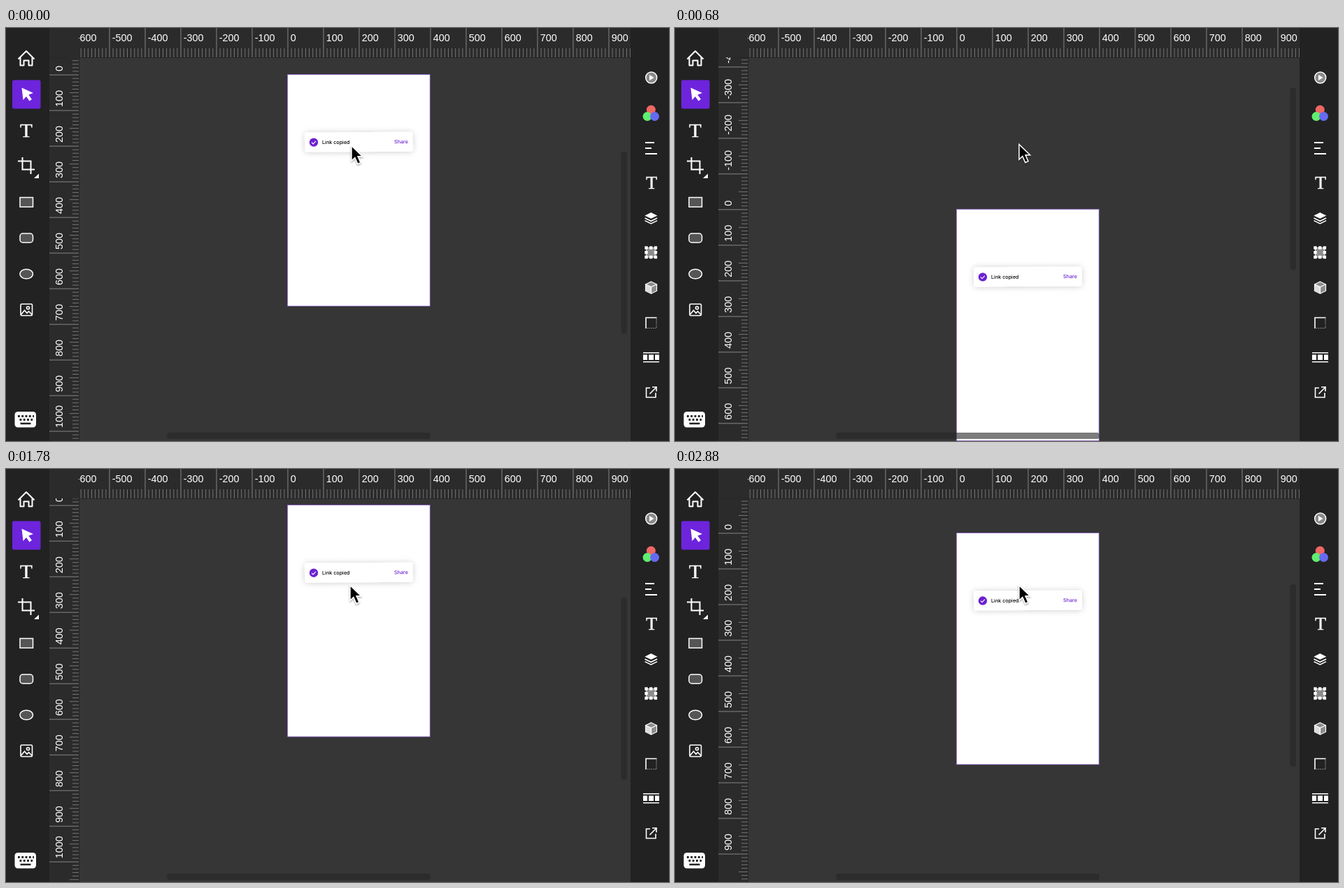
Animation, 948 px wide and 591 px high, one loop 2.91 s. Source, as an HTML page:

```html
<!DOCTYPE html>
<html lang="en">
<head>
<meta charset="utf-8">
<style>
  html, body { margin: 0; width: 100%; height: 100%; overflow: hidden; background: #363636; }
  svg { display: block; width: 948px; height: 591px; }
  .ruler text { font: 14.4px "Liberation Sans", Arial, sans-serif; fill: #fff; }
  .ruler path { stroke: #858585; fill: none; }
  .ruler .minor { stroke: #747474; }
  .toast text { font: 500 7.2px Inter, "Liberation Sans", sans-serif; fill: #000; }
  .toast .action { fill: #6b22d2; }
  .letter { font: 27px "Liberation Serif", serif; fill: #fff; stroke: #fff; stroke-width: .4; text-anchor: middle; }
  .line { fill: none; stroke: #fff; stroke-width: 2; }
  .thin { stroke-width: 1.6; }
  .shape { fill: #555; stroke: #fff; stroke-width: 1.5; }
</style>
</head>
<body>
<svg viewBox="0 0 948 591">
  <defs>
    <clipPath id="topClip"><rect x="104" width="789" height="42"/></clipPath>
    <clipPath id="sideClip"><rect x="62" y="42" width="42" height="549"/></clipPath>
    <filter id="soft" x="-20%" y="-80%" width="140%" height="260%">
      <feDropShadow dx="0" dy="0.5" stdDeviation="4.5" flood-opacity=".2"/>
    </filter>
    <filter id="cursorShadow" x="-50%" y="-50%" width="200%" height="200%">
      <feDropShadow dx="0" dy="1.5" stdDeviation="1.2" flood-opacity=".4"/>
    </filter>
  </defs>

  <rect width="948" height="591" fill="#363636"/>

  <g id="page">
    <rect x="402.5" y="-.6" width="203.7" height="331.5" fill="#fff" stroke="#8250c8" stroke-width=".7"/>
    <g class="toast" transform="rotate(-.3 504.5 96)">
      <rect x="427.3" y="82" width="154.5" height="28" rx="4" fill="#fff" filter="url(#soft)"/>
      <circle cx="440" cy="96.2" r="6.2" fill="#6b22d2"/>
      <path d="M437 96.3l2.1 2.1 3.9-4" fill="none" stroke="#fff" stroke-width="1.1"/>
      <text x="452" y="98.7">Link copied</text>
      <text class="action" x="555" y="98.5">Share</text>
    </g>
  </g>

  <rect x="230.5" y="579" width="376" height="9" rx="3" fill="#262626" fill-opacity=".6"/>
  <rect id="scrollbar" x="879.5" width="8.5" height="261" rx="4" fill="#262626" fill-opacity=".6"/>

  <path d="M62 0H893V42H104V591H62z" fill="#2b2b2b"/>
  <path d="M62 42.5H893M104.5 42V591" stroke="#262626"/>
  <g class="ruler" clip-path="url(#topClip)"><g id="topRuler" transform="translate(403 0)"></g></g>
  <g class="ruler" clip-path="url(#sideClip)"><g id="sideRuler"></g></g>

  <rect width="62" height="591" fill="#222"/>
  <rect x="893" width="55" height="591" fill="#222"/>

  <!-- left tools -->
  <rect x="9" y="74.5" width="40.500" height="41" rx="2.500" fill="#6d24dc"/>
  <path class="line" d="M17.500 44.500L29 33l11.500 11.500M20.500 42V53.500H25.500V46.500H32.500V53.500H37.500V42" stroke-linejoin="round"/>
  <path d="M22.500 85.500L39 93 32.300 95.400 37 102 33.500 104.500 29 98 24.500 103z" fill="#fff"/>
  <text class="letter" transform="translate(29 156) scale(1.080 1)">T</text>
  <path class="line" d="M17 190.500H35.500V209M23.500 185V202.500H41"/>
  <path d="M47 208.500V215H40z" fill="#fff"/>
  <rect class="shape" x="20" y="242.500" width="18.500" height="13.500"/>
  <rect class="shape" x="20" y="294" width="18.500" height="13" rx="4"/>
  <ellipse class="shape" cx="29.200" cy="352" rx="9.300" ry="6.800"/>
  <rect class="line thin" x="21" y="395" width="16.500" height="16.500" rx="1.500"/>
  <path class="line thin" d="M21.500 410l5-6 3.500 4 2.500-2.500 5 5"/>
  <circle class="line thin" cx="31.500" cy="400.500" r="2"/>
  <rect x="12.500" y="549" width="30.500" height="22.500" rx="4.500" fill="#fff"/>
  <path d="M17 555.500H40M19.500 560.500H38" stroke="#222" stroke-width="2.800" stroke-dasharray="2.800 2.500"/>
  <path d="M20.500 566H35.500" stroke="#222" stroke-width="2.500"/>

  <!-- right panels -->
  <circle cx="922.700" cy="71" r="8" fill="#8a8a8a" stroke="#fff" stroke-width="1.500"/>
  <path d="M920 67l6.500 4-6.500 4z" fill="#fff"/>
  <circle cx="922.300" cy="117" r="6.500" fill="#ee6864"/>
  <circle cx="917" cy="126.500" r="6.500" fill="#61ed70"/>
  <circle cx="927.500" cy="126.500" r="6.500" fill="#666af0"/>
  <path class="line" d="M914 164H927M914 172H923M914 180H931"/>
  <text class="letter" style="font-size:25px" transform="translate(923 230) scale(1.060 1)">T</text>
  <path d="M922.300 264l9 4.400-9 4.400-9-4.400z" fill="#fff"/>
  <path class="line thin" d="M913.500 272l8.800 4.300 8.800-4.300M913.500 275.600l8.800 4.300 8.800-4.300"/>
  <rect x="915.500" y="314.500" width="13.500" height="13.500" fill="#8c8c8c" stroke="#ddd"/>
  <g id="handles" fill="#fff"></g>
  <path d="M922.500 363l8 3.800v9.400l-8 4-8-4v-9.400z" fill="#8c8c8c" stroke="#fff" stroke-width="1.200"/>
  <path d="M914.500 366.800l8 3.800V380l-8-4z" fill="#ddd"/>
  <path class="line" style="stroke-width:1.200px" d="M914.500 366.800l8 3.800 8-3.800M922.500 370.600V380"/>
  <path class="line thin" d="M915 430V414.500H930.500"/>
  <path d="M930 416V429.500H916" fill="none" stroke="#bbb" stroke-width="1.200" stroke-dasharray="1.200 1.600"/>
  <path class="line thin" d="M911 464.800H934M911 477.700H934"/>
  <path d="M911 467.500h6v7.500h-6zM919 467.500h7v7.500h-7zM928 467.500h6v7.500h-6z" fill="#fff"/>
  <path class="line thin" d="M921 515H915.500V528.500H929V522M924 513.800H930V520M929.500 514.500L920.500 523.500"/>

  <path id="cursor" d="M0 0V21.500L4.900 17 8.900 26 13 24.200 9.100 15.300H15.700z" fill="#000" stroke="#fff" stroke-width="1.500" filter="url(#cursorShadow)"/>
</svg>
<script>
const LOOP = 2910, UNIT = 0.51, STAGE_HEIGHT = 591;
const byId = id => document.getElementById(id);
const add = (parent, tag, attrs, text = '') => {
  const node = document.createElementNS('http://www.w3.org/2000/svg', tag);
  for (const key in attrs) node.setAttribute(key, attrs[key]);
  node.textContent = text;
  parent.append(node);
  return node;
};

// Returns the labels with their positions along the ruler.
function buildRuler(group, from, to, vertical) {
  const edge = vertical ? 104 : 42, labels = [];
  let major = '', minor = '';
  for (let v = from; v <= to; v += 10) {
    const p = +(v * UNIT).toFixed(2);
    const length = v % 100 === 0 ? 42 : v % 50 === 0 || !vertical ? 13 : 9;
    const tick = vertical ? `M${edge - length} ${p}H${edge}` : `M${p} ${edge - length}V${edge}`;
    if (v % 100) { minor += tick; continue; }
    major += tick;
    const transform = vertical ? `translate(81 ${p - 5}) rotate(-90)` : `translate(${p + 3.8} 19)`;
    labels.push({ p, node: add(group, 'text', { transform }, v) });
  }
  add(group, 'path', { d: minor, class: 'minor' });
  add(group, 'path', { d: major });
  return labels;
}
buildRuler(byId('topRuler'), -600, 1000, false);
const sideLabels = buildRuler(byId('sideRuler'), -600, 1300, true);

for (const x of [0, 1, 2]) for (const y of [0, 1, 2])
  if (x !== 1 || y !== 1)
    add(byId('handles'), 'rect', { x: 913.3 + x * 6.7, y: 312.3 + y * 6.7, width: 4.4, height: 4.4 });

// Scroll position of the page: time, top, speed in px/ms.
const scroll = [
  [0, 66.5, .6], [280, 252, .5], [450, 290, 0], [880, 182, -.52], [1120, 62, -.4],
  [1420, 2, 0], [1780, 52, .17], [1980, 81, .1], [2300, 92, 0], [LOOP, 92, 0]
];

function pageTop(t) {
  const i = scroll.findIndex(k => k[0] > t);
  const [t0, y0, v0] = scroll[i - 1], [t1, y1, v1] = scroll[i];
  const d = t1 - t0, u = (t - t0) / d, w = 1 - u;
  return w * w * ((1 + 2 * u) * y0 + u * d * v0) + u * u * ((3 - 2 * u) * y1 - w * d * v1);
}

function draw(now) {
  const t = now % LOOP;
  const top = pageTop(t);
  const drift = Math.max(0, 1 - t / 200);
  byId('page').setAttribute('transform', `translate(0 ${top})`);
  byId('sideRuler').setAttribute('transform', `translate(0 ${top})`);
  for (const { p, node } of sideLabels)
    node.setAttribute('visibility', top + p > STAGE_HEIGHT ? 'hidden' : 'visible');
  byId('scrollbar').setAttribute('y', 177 - (top - 66.5) * .474);
  byId('cursor').setAttribute('transform', `translate(${492 + 2 * drift} ${166.5 + 2 * drift})`);
  requestAnimationFrame(draw);
}
draw(0);
</script>
</body>
</html>
```
